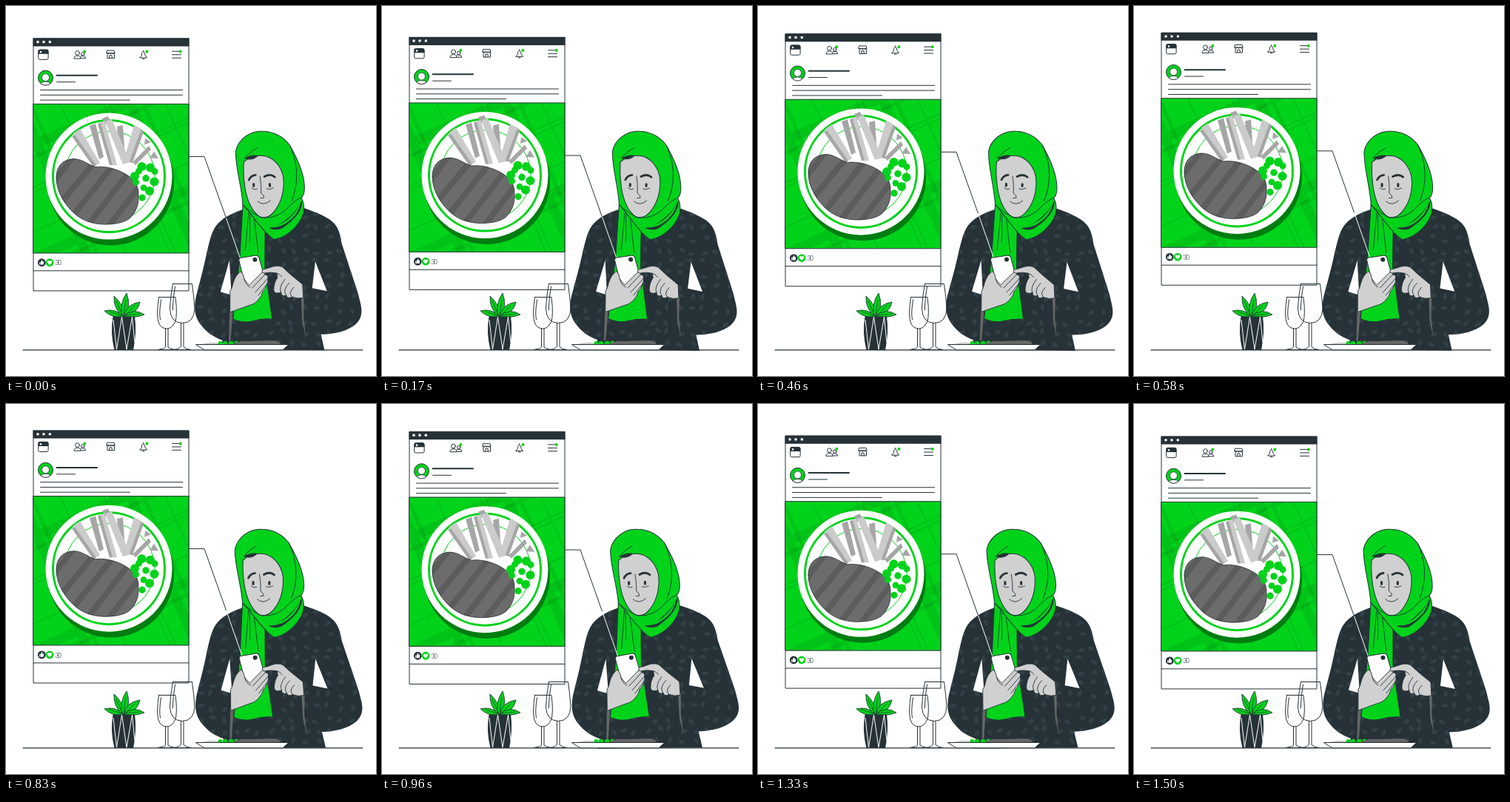
Write an HTML page that moves like this. It is 500 by 500 pixels and loops after 1540 ms.

```html
<!DOCTYPE html>
<html lang="en">
<head>
<meta charset="utf-8">
<title>Sharing a meal</title>
<style>
html, body { margin: 0; width: 100%; height: 100%; overflow: hidden; background: #fff; }
svg { display: block; width: 100%; height: 100%; }
.line { fill: none; stroke: #263238; stroke-linecap: round; stroke-linejoin: round; }
.edge { stroke: #263238; stroke-linejoin: round; }
.dark { fill: #263238; }
.green { fill: #00d31a; }
.white { fill: #fff; }
.skin { fill: #d0d0d0; }
.light { fill: #cbcbcb; }
.mid { fill: #a6a6a6; }
</style>
</head>
<body>
<svg viewBox="0 0 500 500">
<defs>
  <clipPath id="photoClip"><path d="M37 128.3H247V329.8H37Z"/></clipPath>
  <path id="steak" d="M68 228C68 211 78 203 92 202.5C104 203 110 210 121 213.5C133 212 146 215 158 221C171 228 179 236 179 250C180 264 176 274 167 283C158 290 143 291 132 291C112 290 99 284 87 271C76 259 68 244 68 228Z"/>
  <clipPath id="steakClip"><use href="#steak"/></clipPath>
  <path id="coat" d="M320 275C302 281 291 288 284 297C275 309 272 335 266 358L257 393C254 408 255 420 263 430C271 441 280 447 293 452L289 465H431L426 443.5C445 443 462 439 473 429.5C482 421 482 412 479 400L476 388L453.5 320C451 303 447 295 437 288C428 282 415 277 403 273Z"/>
  <clipPath id="coatClip"><use href="#coat"/></clipPath>
</defs>

<g class="float">
  <path class="white edge" d="M37 39.7H247V380.8H37Z"/>
  <path class="dark" d="M36.5 39.5H247.5V50.3H36.5Z"/>
  <g class="white"><circle cx="43" cy="44.5" r="1.8"/><circle cx="51" cy="44.5" r="1.8"/><circle cx="59.3" cy="44.5" r="1.8"/></g>

  <rect class="white edge" x="43.7" y="55" width="13.4" height="13.3" rx="2"/>
  <path class="dark" d="M43.5 60.7V57Q43.5 54.7 46 54.7H55Q57.3 54.7 57.3 57V60.7Z"/>
  <circle class="white" cx="47" cy="58" r="1.3"/>
  <g class="line">
    <circle cx="96.5" cy="59.3" r="2.9"/><circle cx="103.7" cy="60.8" r="2.2"/>
    <path d="M92 66.6Q92 63 96.5 63T101 66.6ZM101.5 66.6H107.8Q107.5 63.3 104 63.3Q101.5 63.3 100.8 64.5"/>
    <path d="M137 56H146L147 59.5H136ZM136 59.5Q138 62 139.6 59.5Q141.5 62 143.3 59.5Q145 62 147 59.5M137 61V66.5H146.5V61M139.8 66.3V62.7H143.2V66.3"/>
    <path d="M181 65.8H190.5L188 62.5Q188 58 185.7 57.5Q183.3 58 183.3 62.5ZM184.5 67.3H187M185.7 57.5V56"/>
    <path d="M224.5 57.2H234M224.5 61.7H236.5M224.5 66.1H236.5"/>
  </g>
  <g class="green"><circle cx="106.3" cy="57.3" r="2"/><circle cx="190.4" cy="57.3" r="2"/><circle cx="235.7" cy="57.3" r="2"/></g>

  <circle class="green edge" cx="53.5" cy="93" r="10"/>
  <path class="white edge" stroke-width=".8" d="M47 100.5Q49 98 53.5 98T60 100.5Q57.3 103 53.5 103T47 100.5Z"/>
  <circle class="white edge" stroke-width=".8" cx="53.5" cy="92.5" r="5"/>
  <path class="line" stroke-width="2" d="M68.5 89.7H123"/>
  <path class="line" d="M68.5 98.6H93.5M46.5 109.4H238.5M46.5 116.2H238.5M46.5 123H167.5"/>

  <g clip-path="url(#photoClip)">
    <path class="green" d="M37 128H247V330H37Z"/>
    <g transform="rotate(-24 142 229)" stroke="#000" stroke-opacity=".08" fill="none">
      <path stroke-width="13" d="M0 145H300M0 285H300M70 80V380M207 80V380"/>
      <path stroke-width="5" d="M0 160H300M0 301H300M84 80V380M223 80V380"/>
      <path stroke-width="2" d="M0 197H300M0 203H300M0 252H300M120 80V380M174 80V380M181 80V380M250 80V380"/>
    </g>
    <circle cx="141.5" cy="233.8" r="85.5" fill="#007d10"/>
    <circle class="white" cx="139" cy="226" r="85.5"/>
    <g fill="none" stroke="#00d31a"><circle cx="139" cy="226" r="75.5" stroke-width="3"/><circle cx="140" cy="226" r="61"/></g>
    <path class="mid" d="M113 158L121 155L132 200L126 203ZM130 148L138 145L141 152L134 156ZM150 159L158 157L161 202L155 204ZM182 162L186 166L171 208L166 207ZM171 207L193 185L196 190L175 211ZM188 174.5L196 180L187 183.5ZM200 192.5L206 202L194 201.5Z"/>
    <path class="light" d="M91 168L100 162L127 208L119 213ZM124 155L133 151L150 211L140 211ZM134 152L143 149L168 207L158 210ZM173 157L183 162L166 208L160 202Z"/>
    <path class="mid" d="M89 172L93 170L122 211L118 213.5ZM124 155L128 154L144 211L140 211Z"/>
    <use href="#steak" fill="#6c6c6c"/>
    <path clip-path="url(#steakClip)" stroke="#5c5c5c" stroke-width="8" d="M58 242L106 180M69 268L132 192M86 285L154 199M108 296L173 211M135 298L187 231M159 300L194 253"/>
    <use href="#steak" class="line" stroke-width=".8"/>
    <g class="green" id="peas"></g>
  </g>
  <path class="line" d="M37 128.3H247V329.8H37ZM37 353.7H247"/>
  <circle class="dark" cx="48.3" cy="342.6" r="5.4"/>
  <path class="white" d="M45.2 341.8H46.6V345.5H45.2ZM47 341.8L48.3 338.8Q49.7 339 49.2 341.2H51.3L50.7 345.5H47Z"/>
  <circle class="green" cx="59" cy="342.6" r="5.4"/>
  <path class="white" d="M59 345.8C54.5 342.7 55.8 339.7 57.4 339.8Q58.6 340 59 341Q59.4 340 60.6 339.8C62.2 339.7 63.5 342.7 59 345.8Z"/>
  <text class="dark" x="66.4" y="346.3" font-family="Roboto, sans-serif" font-weight="300" font-size="9" letter-spacing="-1.3">30</text>
</g>

<path class="line" stroke-width="1.2" d="M23 464.8H482"/>

<g class="green edge" stroke-width=".9">
  <path d="M158 420Q143 422 133 412Q149 408 158 420Z"/>
  <path d="M158 420Q145 409 146 392Q158 402 160 419Z"/>
  <path d="M157 420Q153 402 163 388Q169 404 161 420Z"/>
  <path d="M159 420Q162 403 181 400Q178 415 161 420Z"/>
  <path d="M159 420Q172 407 187 417Q175 422 159 420Z"/>
</g>
<path class="line" stroke-width=".7" d="M158 419L149 399M159 418L162 396M161 418L174 405M163 418L180 416M155 418L140 413"/>
<path class="dark" d="M144.5 419.5H174Q177 441 172 465H146.5Q140.5 441 144.5 419.5Z"/>
<path fill="none" stroke="#fff" d="M145 424L149.5 464L156.5 420L163 464L170.5 420L174 455"/>

<g class="line">
  <path d="M206.5 393.5H229Q232 418 228.5 427Q224 436 217.5 436Q209 436 206 427Q203 418 206.5 393.5ZM209.5 397Q206.5 415 208.5 424M215.5 436V461Q214 463 205 464.5H229Q220 463 219 461V436"/>
  <path d="M225.5 375.5H251.5Q254 393 255 409Q254 428 238.5 428.5Q222 428 221.5 409Q222 393 225.5 375.5ZM228.5 379Q225.5 395 225.2 411M236.5 428.5V460Q235 463 227 464.5H250Q241 463 240 460V428.5"/>
</g>

<g class="sway">
  <use href="#coat" class="dark"/>
  <g id="leaves" clip-path="url(#coatClip)" fill="#324047"></g>
  <path class="white" d="M302 344L290 386.5L305 391ZM418 345L414 381L434 385Z"/>
  <path fill="#666" d="M302.5 410L307 412L304 452L301.5 453ZM399 392L403 393L402.5 420L405.5 447L400.5 425Z"/>

  <path class="green edge" d="M320 266L316 340L307 423Q320 429 333 426Q347 422 360 423L350 352L350 300Z"/>
  <path class="line" stroke-width=".8" d="M328 277L323.5 330M329.5 281V318M335 284L341 334"/>

  <path class="green edge" d="M347 169.3C330 168 313 180 310 197C310 220 318 242 320 269C333 281 344 303 362 315.5C375 314 395 301 402 280Q404 267 399 259Q404 254 403 242C402 223 391 202 383 188C374 176 361 170 347 169.3Z"/>
  <path class="dark" d="M355 300Q365 298 374 292Q393 278 400 262Q402 281 372 301Q363 304 355 300Z"/>
  <path class="green" d="M356 299Q384 294 398 266Q394 286 372 297Q364 300 356 299Z"/>
  <path class="skin edge" d="M321 211C330 203 340 201 351 203C365 207 375 222 375 238C375 256 369 270 361 279Q353 288 343 285C331 277 325 260 322.5 244Q320 227 321 211Z"/>
  <path class="dark" d="M322 206Q331 200 341 202Q335 208 328 207.5Z"/>
  <g class="line" stroke-width=".9">
    <path d="M322 206Q329 197 339 192M320 269Q333 281 346 286Q368 288 383 270Q393 260 399 259M383 188C394 212 396 236 386 263"/>
    <path d="M343 230Q345 240 344.5 253Q349 256 348.5 259Q346 260 344 259.5M340 264Q348 271 357 263M332 246Q335 249 339 247.5M352 247Q356 249 361 246"/>
    <path stroke-width="2.8" d="M328 235Q331 229 337 228.5M349 230.5Q357 226 363 231"/>
  </g>
  <g class="dark"><ellipse cx="334.5" cy="242" rx="1.6" ry="3"/><ellipse cx="356.3" cy="242" rx="1.6" ry="3"/></g>
</g>

<g class="float">
  <path class="line" d="M247 199.4H268L297.5 282.5"/>
  <path fill="none" stroke="#fff" d="M297.5 282.5L319 344"/>
</g>

<g class="sway">
  <path class="white edge" d="M315 344Q314.5 340.8 317.5 340.3L338 337Q341 336.8 342 340L348 361L336 382L324 380Z"/>
  <circle class="dark" cx="336.5" cy="342.7" r="3"/>
  <path class="skin edge" stroke-width=".9" d="M303 386Q306 381 307 375Q310 364 317 359Q321 361 322 369Q326 375 329 377L347 359Q351 360 350 363Q355 363 354 368Q355 373 352 377Q352 382 347 386Q346 392 342 396Q337 403 328 405L303 414Z"/>
  <path class="line" stroke-width=".9" d="M350 363L333 381M354 368L337 387M352 377L341 391M322 369Q324 377 330 380"/>
  <path class="skin edge" stroke-width=".9" d="M346 358Q347 355 352 355L361 352Q369 350 374 353L385 363L401 376L402 394Q394 396 387 393Q380 396 379 391Q372 393 372 387Q363 390 362 384Q362 374 367 367L366 361Q358 359 349 361Q346 361 346 358Z"/>
  <path class="line" stroke-width=".9" d="M366 361Q370 362 373 366M372 387Q368 381 377 369M379 391Q373 384 383 374M387 393Q381 388 389 380"/>
</g>

<path class="light" d="M263 457.5Q275 453 293 456V458Z"/>
<g class="green"><circle cx="289.5" cy="456" r="3"/><circle cx="296" cy="456" r="3.3"/><circle cx="304" cy="456" r="3.3"/><circle cx="311.5" cy="455.5" r="3"/></g>
<path fill="#666" d="M306 458Q313 452 325 453L362 452Q370 452 371 458Z"/>
<path class="white edge" d="M256.5 457.5H382L374 464.8H268Z"/>
</svg>

<script>
const LOOP = 1540;
const draw = (id, markup) => { document.getElementById(id).innerHTML = markup.join(''); };

const peas = [[183.5, 213, 6], [195, 214.5, 6], [201, 219.5, 4.5], [174, 226, 6], [179.5, 219, 4.5], [189, 228.7, 4.7],
  [200.5, 233.5, 6], [186, 241.5, 4.4], [194, 246, 6], [184, 255, 4.6], [175.5, 234, 4.5]];
draw('peas', peas.map(([x, y, r]) => `<circle cx="${x}" cy="${y}" r="${r}"/>`));

let seed = 7;
const random = () => (seed = seed * 16807 % 2147483647) / 2147483647;
const leaves = [];
for (let y = 278; y < 468; y += 16) {
  for (let x = 256; x < 485; x += 16) {
    const px = x + random() * 8, py = y + random() * 8;
    leaves.push(`<path d="M-5 0Q0 -6 5 0Q0 5 -5 0Z" transform="translate(${px} ${py}) rotate(${random() * 180})"/>`);
  }
}
draw('leaves', leaves);

const floating = document.querySelectorAll('.float');
const swaying = document.querySelectorAll('.sway');
const start = performance.now();

function render() {
  const t = (performance.now() - start) % LOOP;
  const wave = 2 * Math.PI * (t + 50) / LOOP;
  const lift = 4.2 * Math.cos(wave);
  const tilt = 0.87 * Math.sin(wave);
  floating.forEach(g => g.setAttribute('transform', `translate(0 ${lift})`));
  swaying.forEach(g => g.setAttribute('transform', `rotate(${tilt} 345 310)`));
  requestAnimationFrame(render);
}
render();
</script>
</body>
</html>
```
